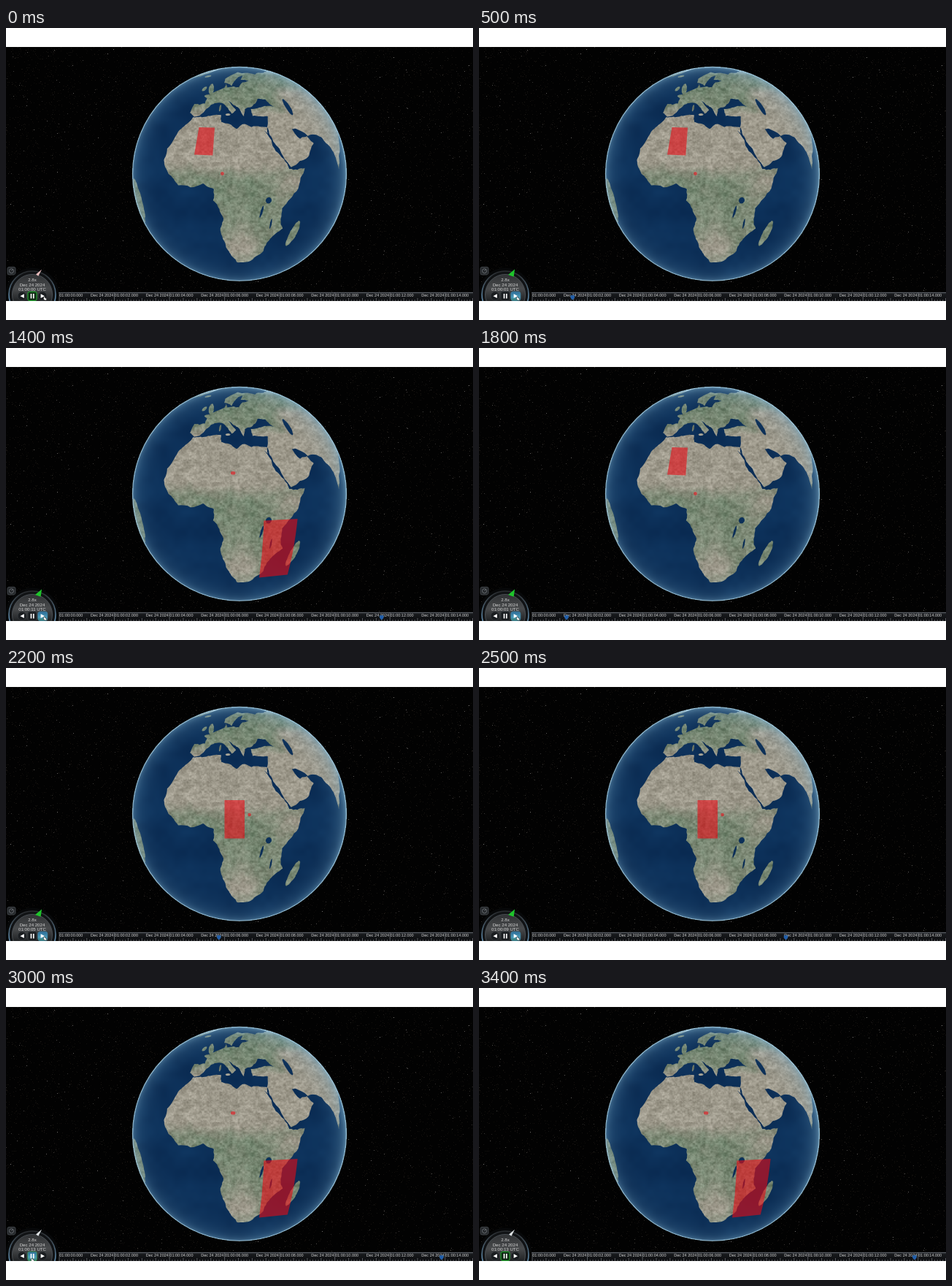
An HTML page with a canvas for the animation above (3500 ms loop, 640 by 400 pixels).

```html
<!DOCTYPE html>
<html lang="en">
<head>
<meta charset="utf-8">
<title>Globe timeline</title>
<style>
html, body { margin: 0; width: 100%; height: 100%; overflow: hidden; background: #fff; }
canvas, svg { position: absolute; left: 0; top: 0; width: 640px; height: 400px; display: block; }
text { font-family: "Liberation Sans", Arial, sans-serif; fill: #d4d4d4; text-anchor: middle; }
.off { display: none; }
</style>
</head>
<body>
<canvas id="globe" width="640" height="400"></canvas>
<svg viewBox="0 0 640 400">
  <defs>
    <linearGradient id="bar" x2="0" y2="1">
      <stop offset="0" stop-color="#30343a"/><stop offset=".25" stop-color="#17191c"/><stop offset="1" stop-color="#0c0d0f"/>
    </linearGradient>
    <linearGradient id="dial" x2="0" y2="1">
      <stop offset="0" stop-color="#303234"/><stop offset=".35" stop-color="#484a4c"/><stop offset=".7" stop-color="#1c1e20"/>
    </linearGradient>
    <linearGradient id="rim" x2="0" y2="1">
      <stop offset="0" stop-color="#2a2d30"/><stop offset=".2" stop-color="#3a444c"/><stop offset=".6" stop-color="#5f89a8"/>
    </linearGradient>
    <linearGradient id="hover" x2="0" y2="1">
      <stop offset="0" stop-color="#2c6a96"/><stop offset=".6" stop-color="#4b9cba"/><stop offset="1" stop-color="#357a68"/>
    </linearGradient>
    <clipPath id="view"><rect y="26" width="640" height="348"/></clipPath>
    <clipPath id="barClip"><rect x="72" y="361" width="568" height="13"/></clipPath>
  </defs>

  <g fill="#ec0a14" fill-opacity=".58">
    <g class="scene"><path d="M264.5 136L286 136.4 283.3 174.4 258 173.6Z"/><circle cx="296.5" cy="199.5" r="2.4"/></g>
    <g class="scene"><path d="M299.5 181H327V233.6H299.5Z"/><circle cx="333.6" cy="201" r="2.3"/></g>
    <g class="scene"><path d="M353.3 236.5L399.6 234Q395.5 275 385.8 310.6L347 314.5Q352.5 275 353.3 236.5Z"/><ellipse cx="311.2" cy="171.2" rx="3.2" ry="2.3"/></g>
  </g>

  <g clip-path="url(#barClip)">
    <rect x="72" y="362" width="568" height="12" fill="url(#bar)"/>
    <path d="M72 362.4H640" stroke="#6b7076" stroke-width=".8"/>
    <path id="ticks" stroke="#8d9196" stroke-width=".6"/>
    <g id="labels" font-size="5.5"></g>
    <path id="marker" d="M-2.4 -2.4H2.4V1L0 3.4 -2.4 1Z" fill="#1f5caa" stroke="#3f80c8" stroke-width=".5"/>
  </g>

  <g clip-path="url(#view)">
    <rect x="2" y="327.5" width="11" height="10.5" rx="2" fill="#24272a" stroke="#4c5156" stroke-width=".8"/>
    <circle cx="7.5" cy="332.8" r="3" fill="none" stroke="#777c80" stroke-width=".8"/>
    <path d="M7.5 332.8L9.5 330.4" stroke="#777c80" stroke-width=".8"/>
    <circle cx="36" cy="365" r="36.5" fill="#070809"/>
    <circle cx="36" cy="365" r="32" fill="#111315" stroke="url(#rim)" stroke-width="1.6"/>
    <circle cx="36" cy="365" r="27.5" fill="url(#dial)" stroke="#4a4f54"/>
    <path id="needle" stroke-width=".5"/>
    <g font-size="6.1">
      <text x="36" y="347.3">2.8x</text>
      <text x="36" y="353.8">Dec 24 2024</text>
      <text x="36" y="360" id="clock">01:00:00 UTC</text>
    </g>
    <g fill="#1a1d20" stroke="#3a3f44" stroke-width=".7">
      <circle cx="22" cy="367.2" r="6"/>
      <circle cx="50" cy="367.2" r="6"/>
      <rect x="30" y="361.2" width="12" height="12.3" rx="2"/>
    </g>
    <rect id="playHover" x="43.8" y="361.2" width="13" height="12.5" rx="3" fill="url(#hover)" stroke="#3f87a6" stroke-width=".8"/>
    <rect id="pauseHover" x="29.8" y="361.2" width="12.4" height="12.5" rx="2" fill="url(#hover)" stroke="#3fa65a" stroke-width=".8"/>
    <rect id="pauseOn" x="30" y="361.4" width="12" height="12" rx="2" fill="#0f2a14" stroke="#22b62e"/>
    <path d="M24.8 364.3V370.1L19.4 367.2Z M33.6 364H35.3V370.4H33.6Z M36.9 364H38.6V370.4H36.9Z M47.6 364.3V370.1L53 367.2Z" fill="#fff"/>
    <path id="hand" d="M0 0L1.2 -.3 1.8 1.6 3.6 2.2 3.4 4.6H1L-.7 2.7Z" fill="#fff" stroke="#111" stroke-width=".5"/>
  </g>
</svg>
<script>
const $ = id => document.getElementById(id);
const CX = 320, CY = 199.8, RADIUS = 146.7, DIST = 4.3, FOCAL = RADIUS * Math.sqrt(DIST * DIST - 1);
const RAD = Math.PI / 180, LON0 = 20.4, LAT0 = 10.7;
const SIN0 = Math.sin(LAT0 * RAD), COS0 = Math.cos(LAT0 * RAD);

// Key points of the two coasts, longitude and latitude; roughen() adds the detail
const africa = "-6 35.8 3 36.7 10.3 37.2 10.8 33.8 19 30.4 22 32.7 31 31.4 34.5 31 34.3 28 32.7 29.6 37.2 20 43 12 51.2 11.8 47 3 39.3 -5 40.6 -15 35 -20 32.6 -27 26 -33.9 19 -34.6 15 -26.5 12 -17 13.4 -9 9 -1 9.4 4 4.5 6.2 -7.6 4.4 -13.5 9 -17.3 14.7 -16.6 20 -12.5 28 -9.7 31";
const eurasia = "-5.5 36.1 -9.2 38 -8.8 43.2 -1.6 43.5 -1.5 46.5 -4.6 48.3 4 52 8.5 54 9 57.3 11 54.3 20 54.6 23 58.5 29 60 21.5 61 24 65.5 17.5 62 14 55.6 7 58 6 62 18 70 40 67 70 72 100 76 120 40 88 21 80 14 77.5 8 72.8 19 67 24.8 57 26 50 30 48 29.8 51.5 25 56.3 26 59.6 22.4 54 16.5 44 12.7 39.2 21 35 28.5 34.5 31.2 36 36.5 27.5 36.8 27 40.5 35 42 41.5 41.6 37.5 46 32 46.3 28 42 23.5 40.4 22.8 36.6 19.4 41.5 13.2 45.5 18.4 40 16 38 10.3 43.6 3.2 43 -.4 38.5 -2 36.8";
// Islands and lakes as ellipses: lon, lat, half width, half height, lean
const islands = [
  [46.8, -18.8, 2.3, 6.8, .28], [-2, 53.3, 2.2, 4.2, -.5], [-8, 53.3, 1.8, 1.8, 0], [-19, 65, 4.5, 1.3, 0],
  [14, 37.5, 1.4, .6, 0], [9, 41, .6, 1.9, 0], [-42, 74, 16, 10, 0], [-47, -10, 12, 12, 0]
];
const lakes = [[51, 41.5, 1.8, 4.8, -.15], [33, -1, 1.3, 1.4, 0], [30, -6, .5, 2.8, .25], [34.5, -12, .4, 2.5, .1]];

const mix = (a, b, k) => a + (b - a) * k;
const smooth = (a, b, v) => {
  const k = Math.min(1, Math.max(0, (v - a) / (b - a)));
  return k * k * (3 - 2 * k);
};
const blend = (a, b, k) => a.map((v, i) => mix(v, b[i], k));
const bump = (lon, lat, x, y, r) => Math.exp(-(((lon - x) / r) ** 2) - ((lat - y) / r) ** 2);

function hash(x, y) {
  let h = Math.imul(x, 374761393) + Math.imul(y, 668265263);
  h = Math.imul(h ^ (h >>> 13), 1274126177);
  return ((h ^ (h >>> 16)) >>> 0) / 4294967296;
}
function noise(x, y) {
  const i = Math.floor(x), j = Math.floor(y), u = smooth(0, 1, x - i), v = smooth(0, 1, y - j);
  return mix(mix(hash(i, j), hash(i + 1, j), u), mix(hash(i, j + 1), hash(i + 1, j + 1), u), v) - .5;
}

function project([lon, lat]) {
  const a = (lon - LON0) * RAD, b = lat * RAD;
  const x = Math.cos(b) * Math.sin(a), c = Math.cos(b) * Math.cos(a), s = Math.sin(b);
  const y = s * COS0 - c * SIN0, z = s * SIN0 + c * COS0;
  const k = z > 1 / DIST ? FOCAL / (DIST - z) : (RADIUS + 2) / Math.hypot(x, y);
  return [CX + x * k, CY - y * k];
}

function unproject(px, py) {
  const u = (px - CX) / FOCAL, v = (CY - py) / FOCAL, a = u * u + v * v + 1;
  const t = (DIST - Math.sqrt(Math.max(0, DIST * DIST - a * (DIST * DIST - 1)))) / a;
  const x = u * t, y = v * t, z = DIST - t;
  return [LON0 + Math.atan2(x, z * COS0 - y * SIN0) / RAD, Math.asin(y * COS0 + z * SIN0) / RAD];
}

// Midpoint displacement
function roughen(points, depth) {
  if (!depth) return points;
  const out = points.flatMap(([x, y], i) => {
    const [nx, ny] = points[(i + 1) % points.length], k = (hash(i, depth) - .5) * .2;
    return [[x, y], [(x + nx) / 2 + (ny - y) * k, (y + ny) / 2 - (nx - x) * k]];
  });
  return roughen(out, depth - 1);
}

const coast = text => {
  const n = text.split(" ").map(Number);
  return n.filter((_, i) => i % 2 === 0).map((lon, i) => [lon, n[2 * i + 1]]);
};
const ellipse = ([lon, lat, w, h, lean]) => Array.from({ length: 12 }, (_, i) => {
  const a = i * Math.PI / 6, y = h * Math.sin(a);
  return [lon + w * Math.cos(a) + lean * y, lat + y];
});

function landMask() {
  const cv = document.createElement("canvas");
  cv.width = 640; cv.height = 400;
  const c = cv.getContext("2d");
  const fill = (points, color) => {
    c.beginPath();
    roughen(points, 3).forEach(p => c.lineTo(...project(p)));
    c.fillStyle = color;
    c.fill();
  };
  c.fillRect(0, 0, 640, 400);
  [coast(africa), coast(eurasia), ...islands.map(ellipse)].forEach(p => fill(p, "#fff"));
  lakes.map(ellipse).forEach(p => fill(p, "#000"));
  return c.getImageData(0, 0, 640, 400).data;
}

function landColor(lon, lat, x, y) {
  const sahara = smooth(6, 18, lat) * smooth(44, 34, lat);
  const steppe = smooth(38, 56, lon) * smooth(22, 30, lat) * smooth(58, 46, lat);
  const south = .85 * bump(lon, lat, 20, -25, 11) + .7 * bump(lon, lat, 45, 6, 8);
  const patch = noise(x / 14, y / 14) * .5 + noise(x / 6, y / 6) * .4;
  const dry = Math.min(1, Math.max(0, Math.max(sahara, steppe, south) + patch * .6 + .2));
  let col = blend([108, 127, 103], [158, 152, 137], dry);
  col = blend(col, [190, 205, 212], smooth(66, 74, lat));
  const grain = noise(x / 9, y / 6) * 22 + noise(x / 3.5, y / 2.6) * 32 + noise(x / 1.6, y / 1.6) * 24;
  return col.map(v => v + grain);
}

function paintGlobe() {
  const c = $("globe").getContext("2d");
  c.fillStyle = "#020202";
  c.fillRect(0, 26, 640, 348);
  for (let i = 0; i < 9000; i++) {
    const g = 22 + 130 * hash(i, 3) ** 24;
    c.fillStyle = `rgba(${g + 5},${g + 1},${g - 3},${.3 + .6 * hash(i, 4)})`;
    c.fillRect(Math.floor(hash(i, 1) * 640), 26 + Math.floor(hash(i, 2) * 347), 1, 1);
  }
  const mask = landMask(), img = c.getImageData(0, 0, 640, 400);
  for (let y = 52; y < 348; y++) for (let x = 172; x < 468; x++) {
    const q = Math.hypot(x + .5 - CX, y + .5 - CY) / RADIUS;
    if (q > 1) continue;
    const p = (y * 640 + x) * 4, [lon, lat] = unproject(x + .5, y + .5);
    const swell = noise(x / 35, y / 28) * 13 + noise(x / 9, y / 9) * 5;
    let col = [8 + swell * .4, 43 + swell * .8, 84 + swell];
    if (mask[p]) col = blend(col, landColor(lon, lat, x, y), mask[p] / 255);
    const east = smooth(-.2, 1, (x - CX + CY - y) / RADIUS / 1.4);
    col = blend(col, [125, 172, 198], Math.min(1, .03 + (.28 + .25 * east) * q ** 12 + .25 * q ** 50));
    col.forEach((v, i) => img.data[p + i] = v);
  }
  c.putImageData(img, 0, 0);
  c.beginPath();
  c.arc(CX, CY, RADIUS - .2, 0, 7);
  c.lineWidth = 1.3;
  c.strokeStyle = "rgba(165,205,225,.75)";
  c.stroke();
}

// Time axis: two seconds between labels
const axisX = s => 73 + s * 37.77;
const two = n => String(n).padStart(2, "0");
function buildAxis() {
  let d = "";
  for (let i = 0; i <= 150; i++) {
    const top = i % 20 === 0 ? 362.5 : i % 5 === 0 ? 370 : 372;
    d += `M${axisX(i / 10).toFixed(2)} ${top}V374`;
  }
  $("ticks").setAttribute("d", d);
  for (let s = 0; s <= 14; s += 2) {
    const t = document.createElementNS("http://www.w3.org/2000/svg", "text");
    t.setAttribute("x", axisX(s));
    t.setAttribute("y", 368.3);
    t.textContent = `Dec 24 2024 01:00:${two(s)}.000`;
    $("labels").append(t);
  }
}

const LOOP = 3500, STEP = 100, SPAN = 15, STOP = 13.87;
function clockAt(ms) {
  const s = Math.max(0, 6.01 + (ms - 900) * .01137);
  return s < SPAN ? s : Math.min(STOP, s - SPAN);
}

const scenes = document.querySelectorAll(".scene");
const show = (el, on) => el.classList.toggle("off", !on);
function render(ms) {
  const s = clockAt(ms), playing = ms >= 400 && ms < 3000;
  const onPause = ms >= 3000 && ms < 3200, onPlay = ms >= 300 && ms < 3000;
  scenes.forEach((el, i) => show(el, i === Math.floor(s / 5)));
  $("clock").textContent = `01:00:${two(Math.floor(s))} UTC`;
  $("marker").setAttribute("transform", `translate(${axisX(s)} 368.8)`);
  show($("marker"), s > 0);
  $("needle").setAttribute("d", playing ? "M49 330.6L40 338 47.6 340.8Z" : "M49 330.8L41 337.6 44.4 339.8Z");
  $("needle").setAttribute("fill", playing ? "#1fc42b" : ms < 400 ? "#e8bcbc" : "#dfe3e4");
  show($("playHover"), onPlay);
  show($("pauseHover"), onPause);
  show($("pauseOn"), !playing && !onPause);
  show($("hand"), ms < 3200);
  $("hand").setAttribute("transform", onPause ? "translate(35 370.5)" : "translate(52 368.3)");
}

paintGlobe();
buildAxis();
const start = performance.now();
(function tick() {
  const t = (performance.now() - start) % LOOP;
  render(Math.floor(t / STEP) * STEP);
  requestAnimationFrame(tick);
})();
</script>
</body>
</html>
```
